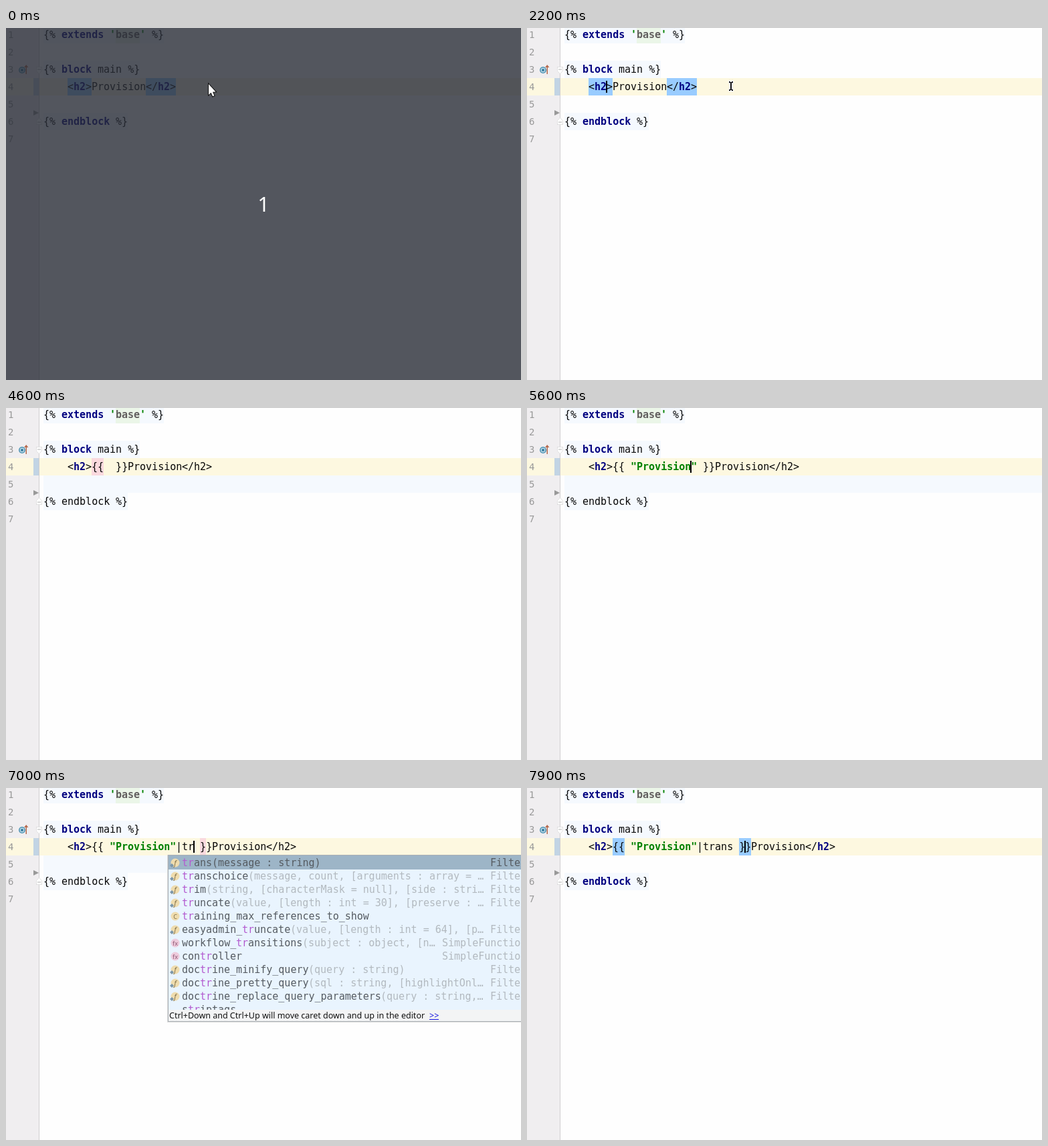
An HTML page with a canvas for the animation above (8000 ms loop, 770 px wide and 527 px high).

```html
<!DOCTYPE html>
<html lang="en">
<head>
<meta charset="utf-8">
<title>Editor</title>
<style>
html, body { margin: 0; width: 100%; height: 100%; overflow: hidden; background: #fefefe; }
canvas { display: block; }
</style>
</head>
<body>
<canvas id="stage" width="770" height="527"></canvas>
<script>
const W = 770, H = 527, LOOP = 8000;
const LEFT = 56, CELL = 9, ROW = 26;
const g = document.getElementById('stage').getContext('2d');

const MONO = '"DejaVu Sans Mono", monospace';
const SANS = '"Noto Sans", "Open Sans", sans-serif';
const NAVY = '#000080', GREEN = '#008000', BLACK = '#080808';
const TINT = '#f5f9fe', MATCH = '#99ccff', PINK = '#fad9de';

// Each step patches the state left by the steps before it.
const steps = [
  [0, { dim: true, mouse: 'arrow', caret: -1, tags: true, select: false, expr: '',
        broken: false, match: [], pink: null, popup: false }],
  [100, { dim: false, mouse: 'beam', caret: 17 }],
  [200, { caret: 4 }],
  [1100, { caret: -1 }],
  [1600, { caret: 4 }],
  [1900, { caret: 5 }],
  [2200, { caret: 7 }],
  [2500, { caret: 8 }],
  [2700, { caret: 17, select: true, tags: false }],
  [3200, { caret: 8, select: false, tags: true }],
  [3600, { caret: 11, expr: '{{  }}', mouse: '' }],
  [3900, { tags: false, broken: true, pink: [8, 2] }],
  [4600, { caret: -1 }],
  [5100, { caret: 11 }],
  [5200, { caret: 12, expr: '{{ "" }}' }],
  [5600, { caret: 21, expr: '{{ "Provision" }}', pink: null }],
  [6000, { caret: 22 }],
  [6200, { caret: 23, expr: '{{ "Provision"| }}' }],
  [6300, { pink: [24, 1] }],
  [6600, { caret: 24, expr: '{{ "Provision"|t }}', pink: [25, 1] }],
  [6700, { caret: 25, expr: '{{ "Provision"|tr }}', pink: [26, 1] }],
  [6900, { popup: true }],
  [7400, { popup: false, caret: 28, expr: '{{ "Provision"|trans }}', pink: [29, 1] }],
  [7500, { broken: false, pink: null, match: [[8, 2], [29, 2]] }],
  [7800, { caret: 29 }],
  [7900, { caret: 30 }]
];

// icon, name, parameters, type
const items = [
  ['f', 'trans', '(message : string)', 'Filter'],
  ['f', 'transchoice', '(message, count, [arguments : array = …', 'Filter'],
  ['f', 'trim', '(string, [characterMask = null], [side : stri…', 'Filter'],
  ['f', 'truncate', '(value, [length : int = 30], [preserve : …', 'Filter'],
  ['c', 'training_max_references_to_show', '', ''],
  ['f', 'easyadmin_truncate', '(value, [length : int = 64], [p…', 'Filter'],
  ['fx', 'workflow_transitions', '(subject : object, [n…', 'SimpleFunction'],
  ['fx', 'controller', '', 'SimpleFunction'],
  ['f', 'doctrine_minify_query', '(query : string)', 'Filter'],
  ['f', 'doctrine_pretty_query', '(sql : string, [highlightOnl…', 'Filter'],
  ['f', 'doctrine_replace_query_parameters', '(query : string,…', 'Filter'],
  ['', 'striptags', '', '']
];

const colX = col => LEFT + col * CELL;
const rowY = row => (row - 1) * ROW - 3;

function rect(x, y, w, h, color) {
  g.fillStyle = color;
  g.fillRect(x, y, w, h);
}

function write(str, x, y, color, font) {
  g.font = font;
  g.fillStyle = color;
  g.fillText(str, x, y);
}

function mono(str, x, y, color, bold) {
  write(str, x, y, color, (bold ? 'bold ' : '') + '15px ' + MONO);
}

function path(points, fill, stroke, width = 1) {
  g.beginPath();
  points.forEach(([x, y]) => g.lineTo(x, y));
  g.closePath();
  if (stroke) { g.strokeStyle = stroke; g.lineWidth = width; g.stroke(); }
  if (fill) { g.fillStyle = fill; g.fill(); }
}

function disc(x, y, r, color) {
  g.beginPath();
  g.arc(x, y, r, 0, Math.PI * 2);
  g.fillStyle = color;
  g.fill();
}

function band(row, col, n, color) {
  rect(colX(col), rowY(row), n * CELL, ROW, color);
}

// Writes [text, color, bold] parts one after another; returns the next column.
function line(row, col, parts) {
  for (const [str, color = BLACK, bold = false] of parts) {
    mono(str, colX(col), rowY(row) + 18, color, bold);
    col += str.length;
  }
  return col;
}

function fold(y, dir) {
  path([[45.5, y - 4.5 * dir], [53.5, y - 4.5 * dir], [53.5, y + 1.5 * dir],
        [49.5, y + 5.5 * dir], [45.5, y + 1.5 * dir]], '#fefefe', '#c4c4c4');
  rect(47, y - dir - .5, 5, 1, '#b4b4b4');
}

function gutter() {
  rect(0, 0, 49, H, '#f0eef0');
  rect(0, rowY(4), 49, ROW, '#fdf8e0');
  rect(49, 0, 1, H, '#d0ced0');
  rect(41, rowY(4), 8, ROW, '#c2d4e4');
  for (let n = 1; n <= 7; n++) write(String(n), 3, rowY(n) + 18, '#999', '14px ' + MONO);
  disc(24, 63, 5, '#4f94b4');
  disc(24, 63, 3.4, '#c0dcea');
  disc(24, 63, 2, '#33799c');
  rect(29.5, 57, 1.5, 12, '#b5694d');
  path([[27, 59], [30.2, 55], [33.4, 59]], '#b5694d');
  path([[41, 123], [49, 127], [41, 131]], '#999');
  fold(63, 1);
  fold(140, -1);
}

function code(s) {
  rect(0, 0, W, H, '#fefefe');
  band(1, 0, 20, TINT);
  band(1, 12, 4, '#ebf6e8');
  band(3, 0, 16, TINT);
  band(6, 0, 14, TINT);
  rect(50, rowY(4), W - 50, ROW, '#fdf8e0');
  if (s.broken) rect(LEFT, rowY(5), W - LEFT, ROW, TINT);
  gutter();

  line(1, 0, [['{% '], ['extends', NAVY, true], [' '], ["'", GREEN, true],
              ['base', '#625f5f', true], ["'", GREEN, true], [' %}']]);
  line(3, 0, [['{% '], ['block', NAVY, true], [' main %}']]);
  line(6, 0, [['{% '], s.broken ? ['endblock'] : ['endblock', NAVY, true], [' %}']]);

  const word = 8 + s.expr.length, close = word + 9;
  if (s.tags) { band(4, 4, 4, MATCH); band(4, close, 5, MATCH); }
  if (s.select) band(4, word, 9, '#a6d2ff');
  if (s.pink) band(4, ...s.pink, PINK);
  s.match.forEach(m => band(4, ...m, MATCH));

  const expr = s.expr.split(/("[^"]*")/).map(p => p[0] === '"' ? [p, GREEN, true] : [p]);
  line(4, 4, [['<'], ['h2', NAVY, true], ['>'], ...expr, ['Provision'], ['</'],
              s.broken ? ['h2'] : ['h2', NAVY, true], ['>']]);
  if (s.caret >= 0) rect(colX(s.caret) - 1, 79, 2, 18, '#000');
}

function icon(kind, y) {
  if (!kind) return;
  const pink = kind === 'fx';
  disc(253, y, 6.5, pink ? '#eecbdc' : '#efdcae');
  g.textAlign = 'center';
  write(kind === 'c' ? 'C' : kind, 253, y + 3.5, pink ? '#8d5874' : '#81704a',
        (kind === 'f' ? 'italic 11px ' : '9px ') + SANS);
  g.textAlign = 'left';
  if (kind === 'f') path([[245, y + 4], [248, y + 1], [251, y + 4], [248, y + 7]], '#7d97a9');
}

function popup() {
  rect(241, 100, W, 251, '#dcdcdc');
  rect(242, 100, W, 250, '#a9afb4');
  rect(243, 101, W, 248, '#e9f4fe');
  rect(243, 101, W, 21, '#9db5c7');
  g.save();
  g.beginPath();
  g.rect(243, 101, W, 231);
  g.clip();
  items.forEach(([kind, name, params, type], i) => {
    const mid = 112 + i * 20, y = mid + 5, at = name.indexOf('tr');
    const soft = i ? '#b2b9bf' : '#555b61';
    const put = (str, col, color) => mono(str, 263 + col * CELL, y, color);
    icon(kind, mid);
    put(name.slice(0, at), 0, '#555b61');
    put('tr', at, '#b35bd0');
    put(name.slice(at + 2), at + 2, '#555b61');
    put(params, name.length, soft);
    mono(type, type === 'Filter' ? 724 : 652, y, soft);
  });
  g.restore();
  rect(243, 332, W, 17, '#f3f4f5');
  const font = '12.5px ' + SANS;
  write('Ctrl+Down and Ctrl+Up will move caret down and up in the editor', 244, 345, '#111', font);
  write('>>', 633, 345, '#1414e0', font);
  rect(633, 346, 14, 1, '#1414e0');
}

function beam() {
  const bars = [[302, 80, 2, 2], [306, 80, 2, 2], [304, 81, 2, 12], [302, 92, 2, 2], [306, 92, 2, 2]];
  bars.forEach(([x, y, w, h]) => rect(x - 1, y - 1, w + 2, h + 2, '#fff'));
  bars.forEach(b => rect(...b, '#111'));
}

function arrow() {
  path([[303, 84], [303, 100], [306.6, 96.8], [309, 102.3], [311.4, 101.2],
        [309, 95.8], [313.5, 95.5]], '#fff', '#111', 2);
}

function draw(t) {
  const s = {};
  for (const [start, patch] of steps) if (t >= start) Object.assign(s, patch);
  code(s);
  if (s.popup) popup();
  if (s.dim) {
    rect(0, 0, W, H, 'rgba(40,44,54,.8)');
    g.textAlign = 'center';
    write('1', 385, 275, '#fff', '31px ' + SANS);
    g.textAlign = 'left';
  }
  if (s.mouse === 'beam') beam();
  if (s.mouse === 'arrow') arrow();
}

const begin = performance.now();
function tick() {
  draw((performance.now() - begin) % LOOP);
  requestAnimationFrame(tick);
}
tick();
</script>
</body>
</html>
```
